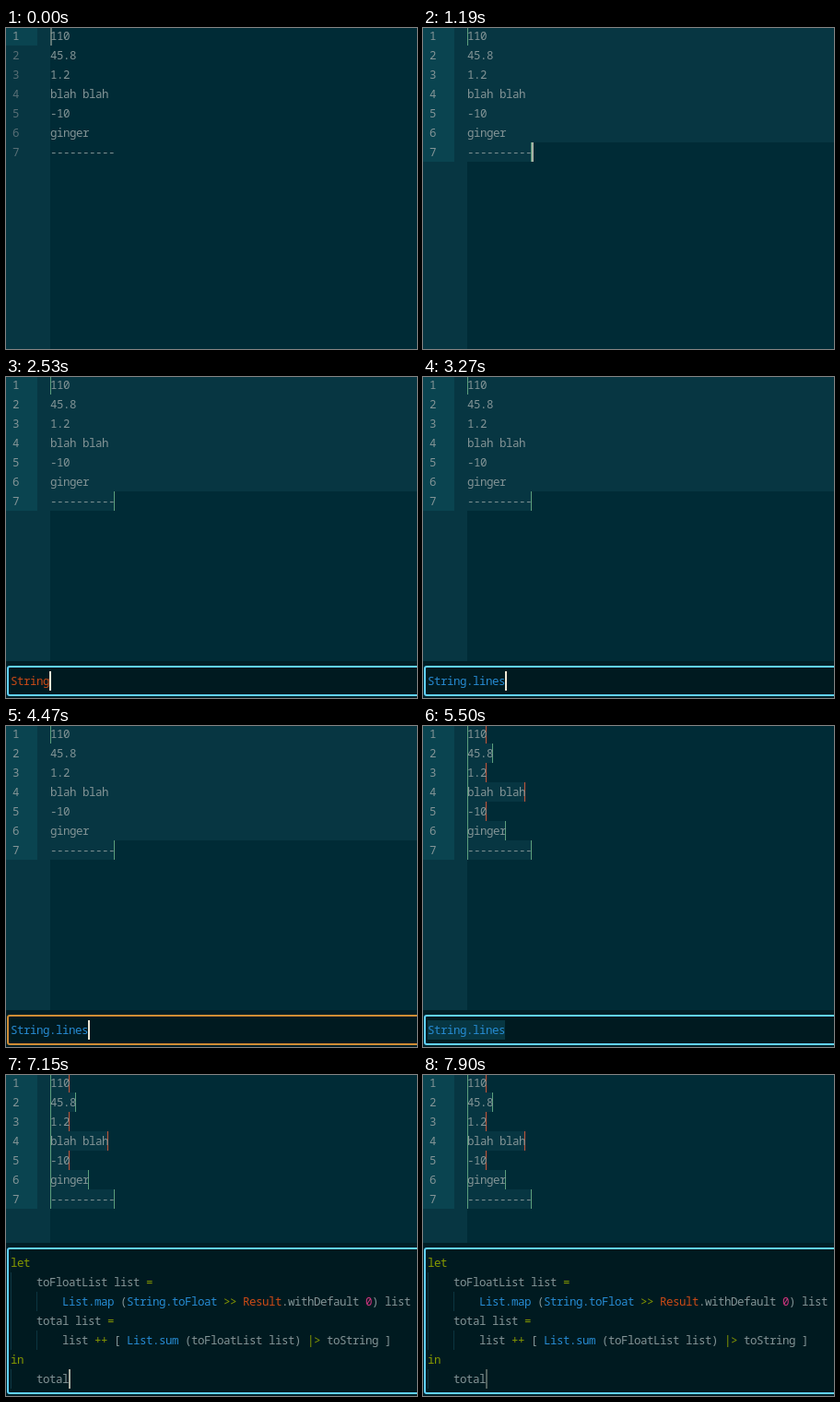
Recreate the animation shown at these times as an HTML page. Size 446 by 348 pixels, loop 8 s.

```html
<!DOCTYPE html>
<html lang="en">
<head>
<meta charset="utf-8">
<title>Editor with command bar</title>
<style>
  html, body { margin: 0; width: 100%; height: 100%; overflow: hidden; background: #002b36; }
  svg { display: block; width: 446px; height: 348px; }
  text { font: 12.5px "Noto Sans Mono", "DejaVu Sans Mono", monospace; fill: #839496; }
</style>
</head>
<body>
<svg id="stage" viewBox="0 0 446 348"></svg>
<script>
const LOOP = 8000, CELL = 7, ROW = 21, EDIT_X = 48, BAR_X = 5, BAR_Y = 319;
const BLUE = '#268bd2', ORANGE = '#cb4b16', GREEN = '#859900', PINK = '#d33682';
const TEXT = '#839496', DIM = '#586e75', RAISED = '#073642', GUTTER = '#0a4450';
const EDGE = '#5b9f7d', EDGE_RED = '#c5573a';
const FOCUS = '#62d2fa', BUSY = '#d08c35', SETTLING = '#99af98';

const lines = ['110', '45.8', '1.2', 'blah blah', '-10', 'ginger', '----------'];
const redEnds = [0, 2, 3, 4];
const code = [
  'let',
  '    toFloatList list =',
  '        List.map (String.toFloat >> Result.withDefault 0) list',
  '    total list =',
  '        list ++ [ List.sum (toFloatList list) |> toString ]',
  'in',
  '    total'
];

const stage = document.getElementById('stage');

function add(parent, tag, attrs = {}) {
  const el = document.createElementNS('http://www.w3.org/2000/svg', tag);
  for (const k in attrs) el.setAttribute(k, attrs[k]);
  return parent.appendChild(el);
}
const group = (parent = stage) => add(parent, 'g');
const rect = (parent, x, y, width, height, fill) =>
  add(parent, 'rect', { x, y, width, height, fill });

// One glyph per cell of the character grid
function setText(el, str, x) {
  el.setAttribute('x', [...str].map((_, i) => x + i * CELL).join(' '));
  el.textContent = str;
}
function write(parent, str, x, top, fill = TEXT) {
  const el = add(parent, 'text', { y: top + 15 });
  el.style.fill = fill;
  setText(el, str, x);
  return el;
}
const lineTop = i => i * ROW - 2;
const lineEnd = i => EDIT_X + lines[i].length * CELL;

// Editor
rect(stage, 0, 0, 446, 348, '#002b36');
rect(stage, 0, 0, 48, 348, RAISED);
const gutter = rect(stage, 0, 0, 34, 19, GUTTER);

const allSel = group();
rect(allSel, EDIT_X, 0, 398, 124, RAISED);
rect(allSel, EDIT_X, 124, 70, ROW, RAISED);
rect(allSel, EDIT_X, 0, 1, 19, EDGE);
rect(allSel, 117, 124, 1, ROW, EDGE);

const lineSel = group();
lines.forEach((s, i) => {
  const end = lineEnd(i);
  rect(lineSel, EDIT_X, lineTop(i), end - EDIT_X, ROW, RAISED);
  rect(lineSel, end - 1, lineTop(i), 1, ROW, redEnds.includes(i) ? EDGE_RED : EDGE);
});
rect(lineSel, EDIT_X, 0, 1, 145, EDGE);

const numbers = lines.map((s, i) => {
  write(stage, s, EDIT_X, lineTop(i));
  return write(stage, String(i + 1), 7, lineTop(i));
});
const editCaret = rect(stage, 0, 0, 2, ROW, '#eee8d5');

// Command bar
const bar = group();
const barBack = rect(bar, 0, 308, 446, 40, '#001f27');
const frame = add(bar, 'rect', { x: 2, width: 460, rx: 2, fill: '#001a20', 'stroke-width': 2 });
const inputSel = rect(bar, BAR_X, BAR_Y, 84, ROW, RAISED);
const input = write(bar, '', BAR_X, BAR_Y, BLUE);

const program = group(bar);
const token = /((?:List|String)\.\w+)|(Result)|(\b(?:let|in)\b|[=>+|]+)|(\b0\b)|[\w.]+|[()[\]]/g;
code.forEach((s, i) => {
  const top = BAR_Y + (i - 6) * ROW;
  const indent = s.search(/\S/);
  for (let col = 0; col < indent; col += 4) rect(program, BAR_X + col * CELL, top, 1, ROW, '#0c3540');
  for (const m of s.matchAll(token)) {
    const fill = m[1] ? BLUE : m[2] ? ORANGE : m[3] ? GREEN : m[4] ? PINK : TEXT;
    write(program, m[0], BAR_X + m.index * CELL, top, fill);
  }
});
const barCaret = rect(bar, 0, BAR_Y, 2, ROW, '#eee8d5');

// Timelines: [start, value], each held until the next
const caretFade = start => [.6, .35, .35, .7, 1].map((v, i) => [start + i * 150, v]);
const editFade = [[0, .4], [150, .35], [300, .7], [450, 1], ...caretFade(740), [1640, .55], [1790, 0]];
const barFade = [[0, 0], [1640, .45], [1790, 1], ...caretFade(3720), ...caretFade(5050).slice(0, 3),
  [5500, 0], [6250, 1], ...caretFade(6700), ...caretFade(7600).slice(0, 3)];
const typed = [[0, 0], [2090, 1], [2240, 3], [2390, 4], [2530, 6], [2820, 7], [2970, 9], [3120, 10], [3270, 12]];
const border = [[0, FOCUS], [4470, BUSY], [4610, SETTLING], [4760, FOCUS]];

const at = (track, t) => track.reduce((v, [start, next]) => t >= start ? next : v, track[0][1]);
const show = (el, on) => el.setAttribute('visibility', on ? 'visible' : 'hidden');

function draw(t) {
  const selected = t >= 740, split = t >= 4610, tall = t >= 6250;

  gutter.setAttribute('height', selected ? 145 : 19);
  numbers.forEach((n, i) => n.style.fill = selected || i === 0 ? TEXT : DIM);
  show(allSel, selected && !split);
  show(lineSel, split);
  editCaret.setAttribute('x', selected ? lineEnd(6) : EDIT_X);
  editCaret.setAttribute('y', lineTop(selected ? 6 : 0));
  editCaret.setAttribute('opacity', at(editFade, t));

  bar.style.display = t >= 1640 ? '' : 'none';
  const top = tall ? 182 : 308;
  barBack.setAttribute('y', top);
  barBack.setAttribute('height', 348 - top);
  frame.setAttribute('y', top + 6);
  frame.setAttribute('height', 339 - top - 0);
  frame.setAttribute('height', 345 - top - 6);
  frame.setAttribute('stroke', at(border, t));

  const count = at(typed, t);
  setText(input, 'String.lines'.slice(0, count), BAR_X);
  input.style.fill = count === 6 ? ORANGE : BLUE;
  show(input, !tall);
  show(inputSel, t >= 5500 && !tall);
  show(program, tall);
  barCaret.setAttribute('x', BAR_X + (tall ? 9 : count) * CELL);
  barCaret.setAttribute('opacity', at(barFade, t));
}

const origin = performance.now();
function tick() {
  draw((performance.now() - origin) % LOOP);
  requestAnimationFrame(tick);
}
tick();
</script>
</body>
</html>
```
